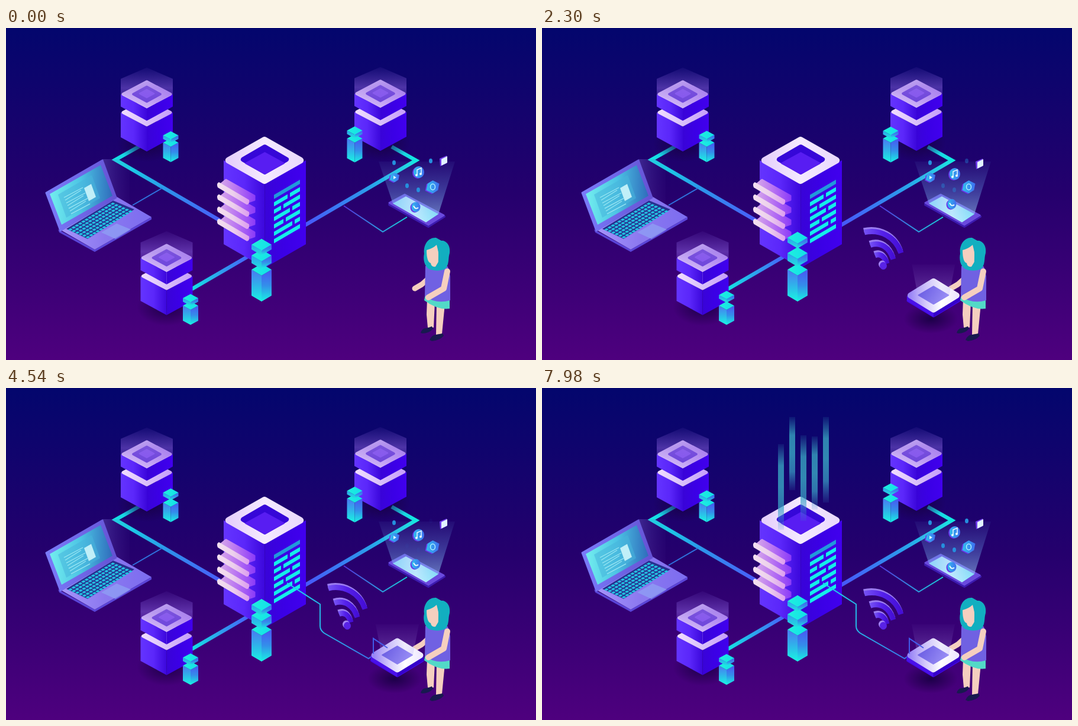
An HTML page that plays this animation: 896 by 562 pixels, repeating every 8 s.

```html
<!DOCTYPE html>
<html lang="en">
<head>
<meta charset="utf-8">
<title>Isometric network</title>
<style>
  html, body { margin: 0; width: 100%; height: 100%; overflow: hidden; background: #2a006f; }
  svg { display: block; width: 100vw; height: 100vh; }
</style>
</head>
<body>
<svg id="stage" viewBox="0 0 896 562" preserveAspectRatio="none"></svg>
<script>
const stage = document.getElementById('stage');
const LOOP = 8000;

// Markup helpers
const times = (n, make) => Array.from({ length: n }, (_, i) => make(i)).join('');
const poly = (points, fill, extra = '') => `<polygon points="${points}" fill="${fill}" ${extra}/>`;
const path = (d, fill, extra = '') => `<path d="${d}" fill="${fill}" ${extra}/>`;
const line = (d, stroke, width, extra = '') =>
  path(d, 'none', `stroke="${stroke}" stroke-width="${width}" ${extra}`);
const ellipse = (x, y, rx, ry, fill, extra = '') =>
  `<ellipse cx="${x}" cy="${y}" rx="${rx}" ry="${ry}" fill="${fill}" ${extra}/>`;
const group = (id, body) => `<g id="${id}">${body}</g>`;
const at = (x, y, body) => `<g transform="translate(${x} ${y})">${body}</g>`;
const shadow = (x, y, rx, ry) => ellipse(x, y, rx, ry, 'url(#shade)');

// Diamond around a centre; soft rounds its corners inside the same outline
function diamond(x, y, w, h, fill, soft = 0) {
  const a = w - soft * .8, b = h - soft * .6;
  return poly(`${x - a},${y} ${x},${y - b} ${x + a},${y} ${x},${y + b}`, fill,
    soft ? `stroke="${fill}" stroke-width="${soft}" stroke-linejoin="round"` : '');
}

// The two visible sides hanging below a diamond
const sides = (x, y, w, h, deep, left, right) =>
  poly(`${x - w},${y} ${x},${y + h} ${x},${y + h + deep} ${x - w},${y + deep}`, left)
  + poly(`${x + w},${y} ${x},${y + h} ${x},${y + h + deep} ${x + w},${y + deep}`, right);

// Stops are "color opacity", spread evenly
function gradient(id, vertical, ...stops) {
  const list = stops.map((s, i) => {
    const [color, alpha = 1] = s.split(' ');
    return `<stop offset="${i / (stops.length - 1)}" stop-color="${color}" stop-opacity="${alpha}"/>`;
  }).join('');
  return `<linearGradient id="${id}" x2="${vertical ? 0 : 1}" y2="${vertical ? 1 : 0}">${list}</linearGradient>`;
}
const across = (id, ...stops) => gradient(id, false, ...stops);
const down = (id, ...stops) => gradient(id, true, ...stops);

const defs = `<defs>
  ${down('sky', '#03066d', '#25006d', '#4e007e')}
  ${across('leftSide', '#6434ff', '#5b27fa', '#3c07dc')}
  ${across('rightSide', '#3903d8', '#3b00e6', '#4100ee')}
  ${across('pale', '#f0dcff', '#d9c0fb', '#c7a0fa')}
  ${across('paleTop', '#e5cffb', '#f5eaff', '#ead9fd')}
  ${down('glass', '#7a58d0 .08', '#8a62e0 .5', '#7a48e0 .12')}
  ${across('slab', '#d7a9ea', '#b873f2', '#8d3df8')}
  ${across('slabEdge', '#f5e0f0', '#ecd0ec', '#dc9cf0')}
  ${across('cubeTop', '#1ff0dc', '#13dfea')}
  ${down('cubeLeft', '#4a78f2', '#2fb4ea', '#18f6e2')}
  ${down('cubeRight', '#4a55f4', '#338fea', '#18f2e4')}
  ${down('cubeSmall', '#2f9df0', '#20e4dd')}
  ${across('wireLeft', '#13e4e4', '#2d93ea', '#4a5cfa')}
  ${across('wireRight', '#4856fa', '#2f93ed', '#13e9e0')}
  ${across('wireLow', '#13e4e4', '#485cfa')}
  ${across('wireThin', '#5632de', '#318fe0', '#17d5dc')}
  ${across('wireNew', '#19dbe9', '#2ba4e8', '#415ceb')}
  ${across('screen', '#72eeee', '#4cc3e4', '#2f6cbc')}
  ${across('lid', '#7a7bfa', '#6552d4')}
  ${across('deck', '#a694fb', '#8b78ef', '#7c6cf0')}
  ${across('sideGlow', '#8a80e8 .3', '#6040b0 .04')}
  ${down('phoneBeam', '#70a8f0 .06', '#70b0f4 .34', '#a4e4ff .6')}
  ${across('phoneScreen', '#93e0fa', '#e8fbff', '#6fe4f2')}
  ${across('icon', '#31c0ee', '#3e6df0')}
  ${across('padTop', '#9a86f6', '#d5cafc', '#ffffff', '#efe8ff')}
  ${across('padScreen', '#4e41dc', '#8b80f5')}
  ${down('padBeam', '#a090e8 .03', '#c0b4fa .38')}
  ${down('ray', '#36a6c4 .1', '#3aadc6 .75', '#3aadc6 .78', '#3aa4c8 .7', '#3588c8 .12')}
  ${across('arc', '#7551f4', '#5420ea', '#450ed6')}
  <radialGradient id="shade"><stop stop-color="#14003f" stop-opacity=".85"/><stop offset="1" stop-color="#1a0040" stop-opacity="0"/></radialGradient>
</defs>`;

// Cube with a cyan lid; y is the top corner
const block = (x, y, w, h, deep, left = 'url(#cubeSmall)') =>
  sides(x, y + h, w, h, deep, left, 'url(#cubeRight)') + diamond(x, y + h, w, h, 'url(#cubeTop)');

const pillar = (id, x, top, bottom) =>
  block(x, top, 13, 7, bottom - top - 14, 'url(#cubeLeft)') + group(id, block(x, 0, 13, 7, 6));

function serverStack(x, y) {
  const tier = (top, deep) => sides(0, top, 44, 24, deep, 'url(#leftSide)', 'url(#rightSide)')
    + diamond(0, top, 44, 24, 'url(#pale)', 5);
  return at(x, y, shadow(0, 84, 50, 31) + tier(31, 42) + tier(0, 21)
    + diamond(0, 0, 26, 15, '#6b45da', 4) + diamond(0, -1, 14, 8, '#8a5cf5', 2)
    + poly('-44,-26 0,-45 44,-26 44,0 0,24 -44,0', 'url(#glass)'));
}

function building() {
  // Each row of code is a full bar with one break, except the first and last
  const bars = times(7, i => {
    const cut = i % 6 ? 8 + i * 15 % 26 : 44;
    return line(`M0 0H${cut}M${cut + 4} 0H${Math.max(44, cut + 4)}`, i ? '#14eeea' : '#2199db', 7,
      `transform="translate(0 ${i * 12.5 + 3.5})"`);
  });
  const slabs = times(4, i => at(0, (3 - i) * 20.6,
    poly('361,266 372,257 420,284 420,291 408,295', 'url(#slab)', 'stroke="url(#slab)" stroke-width="3" stroke-linejoin="round"')
    + path('M360 261L411 291Q412 299 407 299L358 270Q355 263 360 261', 'url(#slabEdge)')));
  return sides(437.5, 224, 69.5, 40, 142, 'url(#leftSide)', 'url(#rightSide)')
    + diamond(437, 224, 69.5, 41, 'url(#paleTop)', 11)
    + diamond(437.5, 222.5, 43, 26, '#3607d8', 8) + diamond(437.5, 229, 34, 19, '#581df2', 2)
    + `<g transform="matrix(1 -.585 0 1 453 282.5)">${bars}</g>` + slabs;
}

function laptop() {
  const keys = times(6, r => line(`M0 ${r + .5}H14`, '#24c4e4', .66, 'stroke-dasharray=".74 .26"'));
  const text = times(7, r => line(`M${98 + r * 2} ${287 + r * 4.6}l${r % 2 ? 27 : 32} -17`, '#b4f4fa', 1.2, 'opacity=".75"'));
  return poly('163,222 209,222 209,300 187,288', 'url(#sideGlow)')
    + poly('88,341 150,375 246,320 246,324 150,379 90,346', '#5a45d8')
    + poly('89,340 186,285 246,320 150,375', 'url(#deck)')
    + poly('102,340 181,292 217,307 138,357', '#27318f')
    + `<g transform="matrix(5.5 -3.35 5.9 2.6 104 341)">${keys}</g>`
    + poly('161,346 187,331 211,341 185,357', '#8fa0f4', 'opacity=".75"')
    + poly('68,279 163,224 186,287 92,343', 'url(#lid)', 'stroke="url(#lid)" stroke-width="3" stroke-linejoin="round"')
    + poly('74,281 160,232 180,284 94,333', 'url(#screen)')
    + poly('88,282 145,249 159,288 102,321', '#47b5dd', 'opacity=".55"') + text
    + poly('132,271 144,264 152,286 140,293', '#c0eff8');
}

function phone() {
  const hexIcon = (r, glyph) => {
    const shape = `0,${-r} ${r},${-r / 2} ${r * .8},${r / 2} 0,${r} ${-r},${r / 2} ${-r * .8},${-r / 2}`;
    return poly(shape, '#6a35ea', 'transform="translate(-2 1)"') + poly(shape, 'url(#icon)') + glyph;
  };
  const disc = (r, glyph) => ellipse(-2, 1, r, r + 1, '#6a35ea') + ellipse(0, 0, r, r + 1, 'url(#icon)') + glyph;
  const note = line('M-3 5V-4L4 -7V3', '#e8fbff', 1.5) + ellipse(-4, 5, 2, 2, '#e8fbff') + ellipse(3, 3, 2, 2, '#e8fbff');
  const dots = [[656, 228], [718, 225], [678, 267], [697, 274]];
  return poly('648,299 674,284 741,319 714,336', '#3d1bb0', 'stroke="#3d1bb0" stroke-width="4" stroke-linejoin="round"')
    + poly('648,296 674,282 740,317 714,333', '#6a4ade', 'stroke="#6a4ade" stroke-width="3" stroke-linejoin="round"')
    + poly('654,297 676,285 731,315 710,329', 'url(#phoneScreen)')
    + poly('630,226 759,226 731,315 710,328 654,297', 'url(#phoneBeam)')
    + dots.map(([x, y], i) => ellipse(x, y, 3, 4, '#258fdd', i ? 'class="dot"' : '')).join('')
    + at(657, 253, hexIcon(8, poly('-2,-3 3,0 -2,3', '#d8fbff')))
    + at(698, 0, group('music', disc(9, note)))
    + at(721.5, 269, hexIcon(11, ellipse(0, 0, 4, 5, 'none', 'stroke="#aef2ff" stroke-width="1.5"')))
    + at(740, 0, group('card', poly('-7,-4 5,-9 5,4 -6,9', '#713bed') + poly('-4,-3 6,-8 6,3 -4,8', '#e2f4ff')))
    + at(693, 0, group('bubble', disc(7.5, line('M-4 -2Q-1 5 4 1', '#e6fbff', 2))));
}

const skin = '#f5cfbf', hair = '#12afc0', navy = '#18194f';
const limb = (d, width) => line(d, skin, width, 'stroke-linecap="round" stroke-linejoin="round"');
const girlBack = limb('M714 424L703 434L691 441', 9);
const girlFront = poly('712,458 725,464 723,507 713,507 711,485', skin)
  + poly('728,464 742,467 737,518 727,519', skin)
  + path('M701 516Q704 507 712 508L720 505L722 509Q715 517 704 517Z', navy)
  + path('M716 528Q720 519 728 519L738 517L740 521Q733 529 720 530Z', navy)
  + path('M709 449Q727 463 750 458V475Q730 478 707 461Z', '#52d9c7')
  + path('M709 403Q727 395 747 404L751 420V461Q727 468 708 454Z', '#7061e2')
  + path('M727 355C714 354 705 367 707 382C704 395 710 407 718 409Q731 413 742 408C750 401 747 390 750 381C752 367 743 359 736 360Z', hair)
  + path('M711 376Q722 373 728 367L734 391L726 404Q719 405 718 398Q711 396 711 376Z', skin)
  + path('M728 365C733 376 730 390 731 409Q748 407 747 390L748 372Z', hair)
  + limb('M746 412L740 441L714 456', 10);

const pad = shadow(657, 492, 46, 25)
  + diamond(661.5, 461, 47, 29, '#4209e4', 6)
  + sides(661.5, 453, 45, 28, 8, '#4a10ea', '#3500ca')
  + diamond(661.5, 452.5, 47, 30, 'url(#padTop)', 10)
  + diamond(661.5, 452, 27, 16, 'url(#padScreen)', 2)
  + poly('625,400 698,400 688,452 661,468 635,453', 'url(#padBeam)');

const arcs = ['M545 349C572 343 598 357 607 384', 'M555 369C573 363 588 374 594 393', 'M563 386C573 382 580 389 583 400'];
const wifi = arcs.map((d, i) => group('arc' + i,
    line(d, '#9b7cf0', 9, 'transform="translate(-1 -3)"') + line(d, 'url(#arc)', 9))).join('')
  + ellipse(575, 400, 6, 6.5, '#a483f4') + ellipse(577, 402.5, 6, 6.5, '#5922e6');

const rayTops = [95, 49, 80, 82, 49];
const rays = rayTops.map((y, i) =>
  `<rect id="ray${i}" x="${399 + i * 19}" y="${y}" width="10" height="${i % 2 ? 124 : 145}" fill="url(#ray)"/>`).join('');
const drawable = 'pathLength="100" stroke-dasharray="100 200"';

stage.innerHTML = defs + '<rect width="896" height="562" fill="url(#sky)"/>'
  + line('M226 200L185 223L362 326', 'url(#wireLeft)', 6.5)
  + line('M652 201L693 224L505 334', 'url(#wireRight)', 6.5)
  + line('M314 442L412 385', 'url(#wireLow)', 6.5)
  + line('M264 271L214 300', '#2f73df', 2)
  + line('M571 301L637 345L678 320', 'url(#wireThin)', 2)
  + serverStack(238, 112) + serverStack(633, 111) + serverStack(271.5, 389)
  + laptop() + phone() + building() + rays
  + pillar('cubeA', 278.5, 187, 227) + pillar('cubeB', 589.5, 180, 227.5) + pillar('cubeC', 312, 463, 502.5)
  + block(432, 399, 17, 10, 44, 'url(#cubeLeft)')
  + group('middle', block(432, 0, 17, 10, 13)) + group('upper', block(432, 0, 17, 10, 8))
  + group('wifi', wifi)
  + line('M645 440L621 424V452L613 458L538 415Q531 410 531 403V366L475 330', 'url(#wireNew)', 2, 'id="link" ' + drawable)
  + girlBack + group('pad', pad)
  + line('M645 440L621 424V450', '#4357e8', 1.6, 'id="padLink" ' + drawable)
  + girlFront;

// Motion helpers
const part = id => document.getElementById(id);
const move = (id, x, y) => part(id).setAttribute('transform', `translate(${x.toFixed(2)} ${y.toFixed(2)})`);
const fade = (el, alpha) => el.setAttribute('opacity', alpha.toFixed(3));
const ease = (t, from, to) => (1 - Math.cos(Math.PI * Math.min(1, Math.max(0, (t - from) / (to - from))))) / 2;
const bob = (t, mean, size, period, lowest) => mean + size * Math.cos(2 * Math.PI * (t - lowest) / period);
function draw(id, share) {
  part(id).setAttribute('stroke-dashoffset', 100 - 100 * Math.min(1, share));
  fade(part(id), share > 0 ? 1 : 0);
}

function render(t) {
  move('cubeA', 0, bob(t, 172, 3, 2900, 2700));
  move('cubeB', 0, bob(t, 164, 3, 2400, 2200));
  move('cubeC', 0, bob(t, 447.5, 2.7, 4000, 0));
  move('upper', 0, bob(t, 351, 6, 4700, 4500));
  move('middle', 0, bob(t, 373, 2, 4700, 4500));

  const away = 1 - ease(t, 250, 2500);
  move('pad', 20 * away, 13 * away);
  fade(part('pad'), ease(t, 250, 1300));

  move('wifi', 0, -40 * (1 - ease(t, 900, 2250)));
  fade(part('wifi'), ease(t, 900, 1750));
  const lift = bob(t, -5, 5, 960, 3080);
  arcs.forEach((_, i) => move('arc' + i, 0, lift / (1 + i)));

  const drawn = ease(t, 2800, 4450);
  draw('link', drawn);
  draw('padLink', drawn * 4.5);

  // The last ray comes late; the second one dims once
  rayTops.forEach((_, i) => {
    const start = i === 4 ? 6200 : 5000 + i % 2 * 250;
    const dip = i === 1 ? .7 * (ease(t, 6500, 6960) - ease(t, 6960, 7600)) : 0;
    fade(part('ray' + i), ease(t, start, start + 600) - dip);
  });

  const swell = bob(t, .5, .5, LOOP, 0);
  stage.querySelectorAll('.dot').forEach(dot => fade(dot, swell));
  move('bubble', 0, 298 + 5 * swell ** 4);
  move('music', 0, 249 - 5 * swell);
  move('card', 0, 225 + 5 * ease(t, 0, 1500));
}

function tick(now) {
  render(now % LOOP);
  requestAnimationFrame(tick);
}
render(0);
requestAnimationFrame(tick);
</script>
</body>
</html>
```
